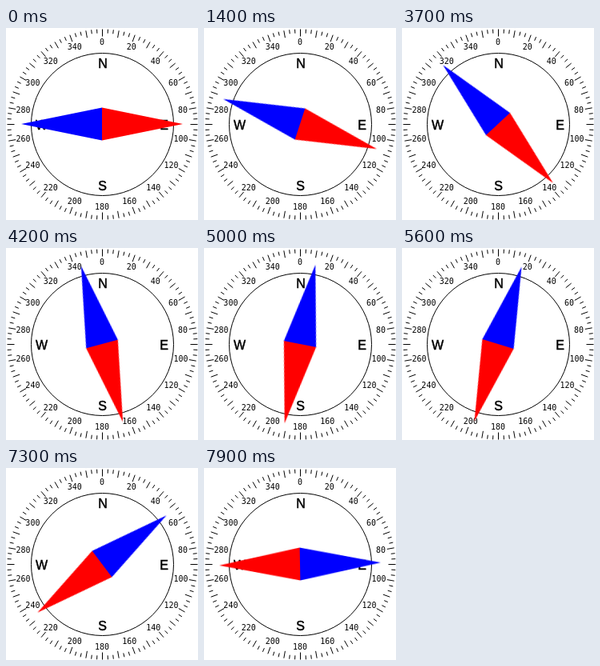
An HTML page that plays this animation: 240 px wide and 240 px high, repeating every 8 s.

```html
<!DOCTYPE html>
<html lang="en">
<head>
<meta charset="utf-8">
<title>Compass</title>
<style>
  html, body { margin: 0; width: 100%; height: 100%; overflow: hidden; background: #fff; }
  svg { display: block; width: 100%; height: 100%; }
  line, circle { stroke: #000; fill: none; }
  text { text-anchor: middle; }
  #scale text { font: 10px "DejaVu Sans Mono", monospace; }
  #points text { font: 16px "Liberation Sans", Arial, sans-serif; stroke: #000; stroke-width: .5; }

  /* One move per 100 ms: 6 degrees, then 4, then 1 near the heading.
     The small negative delay keeps samples clear of the step edges. */
  #needle {
    transform-origin: 120px 120px;
    animation: turn 8s -2ms infinite;
  }
  @keyframes turn {
    0%     { transform: rotate(270deg); animation-timing-function: step-end; }
    13.75% { transform: rotate(270deg); animation-timing-function: steps(1, start); }
    15%    { transform: rotate(276deg); animation-timing-function: steps(7, start); }
    23.75% { transform: rotate(304deg); animation-timing-function: steps(7, start); }
    32.5%  { transform: rotate(311deg); animation-timing-function: step-end; }
    46.25% { transform: rotate(311deg); animation-timing-function: steps(5, start); }
    52.5%  { transform: rotate(341deg); animation-timing-function: steps(7, start); }
    61.25% { transform: rotate(369deg); animation-timing-function: steps(8, start); }
    71.25% { transform: rotate(377deg); animation-timing-function: step-end; }
    85%    { transform: rotate(377deg); animation-timing-function: steps(12, start); }
    100%   { transform: rotate(449deg); }
  }
</style>
</head>
<body>
<svg viewBox="0 0 240 240">
  <g id="scale"></g>
  <circle cx="120.5" cy="120.5" r="89"/>
  <g id="points">
    <text x="121" y="50">N</text>
    <text x="197.5" y="127">E</text>
    <text x="120.5" y="203">S</text>
    <text x="44.5" y="127">W</text>
  </g>
  <g id="needle">
    <path fill="#00f" d="M120 19L140.5 120H99.5Z"/>
    <path fill="#f00" d="M120 221L140.5 120H99.5Z"/>
  </g>
</svg>
<script>
  const scale = document.getElementById("scale");

  function add(name, attrs, text = "") {
    const el = document.createElementNS("http://www.w3.org/2000/svg", name);
    for (const key in attrs) el.setAttribute(key, attrs[key]);
    el.textContent = text;
    scale.append(el);
  }

  // Two short ticks between the long ones, which stand 10 degrees apart.
  for (let i = 0; i < 108; i++) {
    const deg = i * 10 / 3;
    const a = deg * Math.PI / 180, sin = Math.sin(a), cos = Math.cos(a);
    const inner = i % 3 ? 114 : 110;
    add("line", {
      x1: 120.5 + 119 * sin, y1: 120.5 - 119 * cos,
      x2: 120.5 + inner * sin, y2: 120.5 - inner * cos
    });
    if (i % 6 === 0) {
      const shift = deg > 0 && deg < 100 ? 2.5 : 0;
      add("text", { x: 120 + 100 * sin + shift, y: 123.7 - 103 * cos }, Math.round(deg));
    }
  }
</script>
</body>
</html>
```
